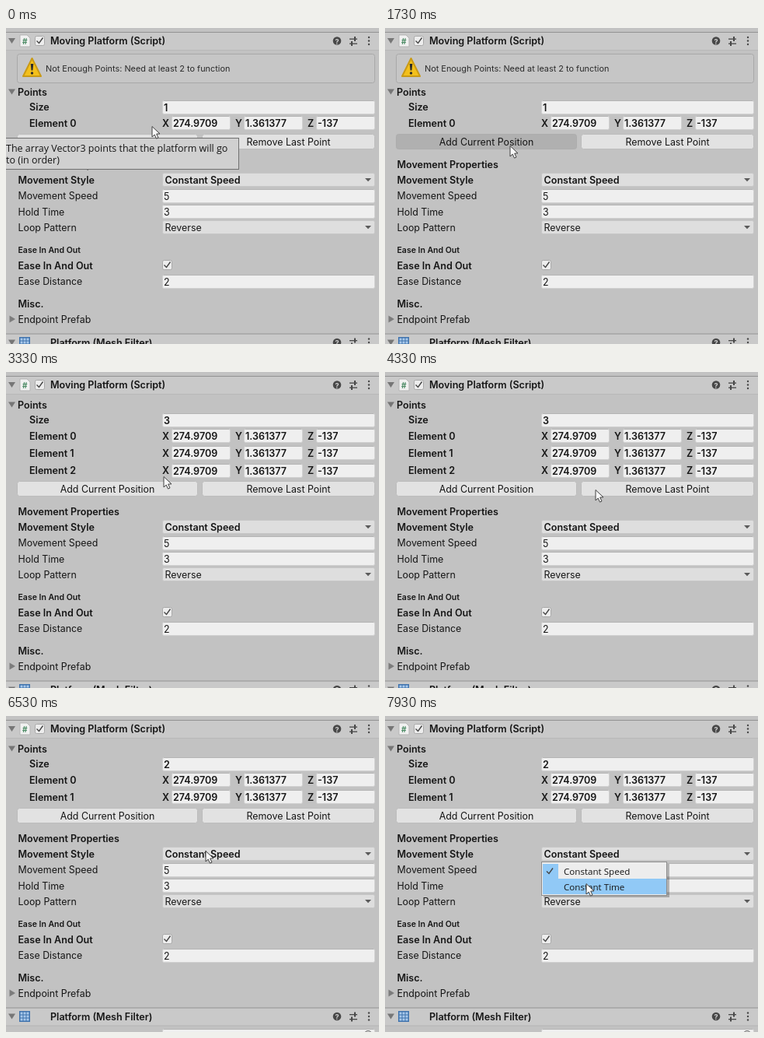
Recreate the animation shown at these times as an HTML page with a canvas. Size 480 by 406 pixels, loop 8 s.

```html
<!DOCTYPE html>
<html lang="en">
<head>
<meta charset="utf-8">
<title>Moving platform inspector</title>
<style>
html, body { margin: 0; width: 100%; height: 100%; overflow: hidden; background: #c2c2c2; }
canvas { display: block; }
</style>
</head>
<body>
<canvas id="stage" width="480" height="406"></canvas>
<script>
const ctx = document.getElementById('stage').getContext('2d');
const LOOP = 8000;
const REGULAR = '12.4px Inter, sans-serif';
const BOLD = '600 12.55px Inter, sans-serif';
const SMALL = '10.9px Inter, sans-serif';
const SMALL_BOLD = '600 10.5px Inter, sans-serif';
const INK = '#161616';

// Pointer positions: [ms, x, y]
const PATH = [
  [70, 188, 127], [530, 172, 183], [670, 172, 183], [930, 161, 152],
  [2330, 161, 152], [2530, 38, 112], [2730, 254, 146], [2800, 262, 149],
  [3130, 203, 135], [3400, 203, 135], [4000, 269, 151], [4200, 269, 151],
  [4330, 271, 152], [6000, 271, 152], [6530, 257, 174], [7470, 257, 174],
  [7930, 259, 216]
];

function pointerAt(t) {
  const i = PATH.findIndex(p => p[0] > t);
  if (i === 0) return PATH[0].slice(1);
  if (i < 0) return PATH[PATH.length - 1].slice(1);
  const [t0, x0, y0] = PATH[i - 1], [t1, x1, y1] = PATH[i];
  const k = (t - t0) / (t1 - t0), e = k * k * (3 - 2 * k);
  return [x0 + (x1 - x0) * e, y0 + (y1 - y0) * e];
}

function text(s, x, y, font = REGULAR, color = INK, align = 'left') {
  ctx.font = font;
  ctx.fillStyle = color;
  ctx.textAlign = align;
  ctx.fillText(s, x, y + 4.5);
}

function rect(x, y, w, h, color) {
  ctx.fillStyle = color;
  ctx.fillRect(x, y, w, h);
}

function poly(points, fill, stroke, width = 1) {
  ctx.beginPath();
  points.forEach(([x, y]) => ctx.lineTo(x, y));
  if (fill) {
    ctx.closePath();
    ctx.fillStyle = fill;
    ctx.fill();
  }
  if (stroke) {
    ctx.strokeStyle = stroke;
    ctx.lineWidth = width;
    ctx.stroke();
  }
}

function panel(x, y, w, h, fill, border, r = 2) {
  ctx.beginPath();
  ctx.roundRect(x + .5, y + .5, w - 1, h - 1, r);
  ctx.fillStyle = fill;
  ctx.fill();
  ctx.strokeStyle = border;
  ctx.lineWidth = 1;
  ctx.stroke();
}

function disc(x, y, r, color) {
  ctx.beginPath();
  ctx.arc(x, y, r, 0, 7);
  ctx.fillStyle = color;
  ctx.fill();
}

function field(x, y, w, value, font) {
  const top = Math.round(y - 9);
  panel(x, top, w, 18, '#efefef', '#d0d0d0');
  rect(x + 2, top, w - 4, 1, '#b4b4b4');
  text(value, x + 2, y + .5, font);
}

function dropdown(y, value, font) {
  panel(201, y - 9, 274, 18, '#dedede', '#c6c6c6');
  text(value, 204.5, y, font);
  poly([[462, y - 2], [470, y - 2], [466, y + 2.3]], '#5a5a5a');
}

function button(x, w, y, label, pressed) {
  panel(x, y - 10, w, 20, pressed ? '#b0b0b0' : '#e2e2e2', pressed ? '#adadad' : '#bcbcbc', 3);
  text(label, x + w / 2, y, REGULAR, INK, 'center');
}

function check(x, y) {
  poly([[x - 4, y], [x - 1, y + 3], [x + 4, y - 4]], null, '#444', 1.4);
}

function checkbox(x, y) {
  panel(x - 6.5, y - 6.5, 13, 13, '#ededed', '#a8a8a8');
  check(x, y);
}

function foldDown(y) {
  poly([[3, y - 3.5], [12, y - 3.5], [7.5, y + 3.5]], '#767676');
}

function header(y, title) {
  rect(0, y - 11.5, 480, 23, '#c9c9c9');
  rect(0, y - 11.5, 480, 1, '#929292');
  rect(0, y + 11.5, 480, 1, '#b8b8b8');
  foldDown(y);
  text(title, 57, y, BOLD);
  disc(426, y, 5.3, '#484848');
  text('?', 426, y - .5, '700 9px Inter, sans-serif', '#d5d5d5', 'center');
  rect(442, y - 3, 10, 1.3, '#484848');
  rect(442, y + 3, 10, 1.3, '#484848');
  rect(448, y - 5.5, 2, 6, '#484848');
  rect(444, y + .5, 2, 6, '#484848');
  for (const d of [-4.5, 0, 4.5]) disc(467, y + d, 1.2, '#484848');
}

function scriptIcon() {
  poly([[18, 9], [27, 9], [31, 13], [31, 24], [18, 24]], '#f1f1f1', '#b5b5b5');
  text('#', 24.3, 16.5, '700 10px Inter, sans-serif', '#4a8a63', 'center');
}

function gridIcon(y) {
  rect(17, y - 7, 14, 14, '#3f72ad');
  for (let i = 0; i < 9; i++) {
    rect(18.5 + i % 3 * 4, y - 5.5 + Math.floor(i / 3) * 4, 3, 3, '#a9c9ec');
  }
}

function warning() {
  panel(14, 33, 461, 38, '#c6c6c6', '#a8a8a8', 3);
  ctx.lineJoin = 'round';
  poly([[33.5, 39], [45, 62], [22, 62], [33.5, 39]], '#f3c01c', '#c99a15', 2);
  ctx.lineJoin = 'miter';
  poly([[31.7, 46], [35.3, 46], [34.4, 54.5], [32.6, 54.5]], '#2b2b2b');
  disc(33.5, 58, 1.7, '#2b2b2b');
  text('Not Enough Points: Need at least 2 to function', 51, 51.5, SMALL, '#2b2b2b');
}

function inspector(count, pressed) {
  rect(0, 0, 480, 406, '#c2c2c2');
  header(16.5, 'Moving Platform (Script)');
  scriptIcon();
  checkbox(43.5, 16.5);

  const top = count < 2 ? 82 : 42;
  if (count < 2) warning();
  foldDown(top);
  text('Points', 15, top, BOLD);
  text('Size', 30, top + 19.5, BOLD);
  field(201, top + 19.5, 274, count, BOLD);
  for (let i = 0; i < count; i++) {
    const y = top + 40 + i * 22.3;
    text('Element ' + i, 30, y, BOLD);
    [['X', 201, 213, 76, '274.9709'], ['Y', 295, 306, 76, '1.361377'], ['Z', 388, 399, 76, '-137']]
      .forEach(([axis, ax, x, w, value]) => {
        text(axis, ax, y, BOLD);
        field(x, y, w, value, BOLD);
      });
  }

  const base = top + 64 + (count - 1) * 22;
  button(14, 233, base, 'Add Current Position', pressed === 'add');
  button(252, 223, base, 'Remove Last Point', pressed === 'remove');
  const label = (s, dy, font) => text(s, 15.5, base + dy, font);
  label('Movement Properties', 29, BOLD);
  label('Movement Style', 49, BOLD);
  dropdown(base + 49, 'Constant Speed', BOLD);
  label('Movement Speed', 69.7);
  field(201, base + 69.7, 274, '5');
  label('Hold Time', 90);
  field(201, base + 90, 274, '3');
  label('Loop Pattern', 110);
  dropdown(base + 110, 'Reverse');
  label('Ease In And Out', 138.7, SMALL_BOLD);
  label('Ease In And Out', 159, BOLD);
  checkbox(207.5, base + 158.5);
  label('Ease Distance', 179.5);
  field(201, base + 179.5, 274, '2');
  label('Misc.', 208, BOLD);
  label('Endpoint Prefab', 228.5);
  const arrow = base + 228;
  poly([[4.5, arrow - 4.5], [12, arrow], [4.5, arrow + 4.5]], '#7c7c7c');

  header(base + 258, 'Platform (Mesh Filter)');
  gridIcon(base + 258);
  field(201, base + 283, 274, '');
  disc(466, base + 281, 5, '#666');
  disc(466, base + 281, 4, '#dedede');
}

function tooltip() {
  rect(0, 141, 300, 41, '#707070');
  rect(0, 142, 299, 39, '#d0d0d0');
  const font = '12.5px "Open Sans", sans-serif';
  text('The array Vector3 points that the platform will go', 0, 154, font);
  text('to (in order)', 0, 169, font);
}

function popup(alpha, pointerY) {
  ctx.globalAlpha = alpha;
  rect(204, 190, 162, 43, 'rgba(0,0,0,.25)');
  rect(201, 187, 162, 44, '#8d8d8d');
  rect(202, 188, 160, 42, '#ededed');
  const blue = '#91c9f6';
  rect(203, 190, 20, 19, blue);
  if (pointerY >= 209) rect(203, 209, 159, 20, blue);
  else if (pointerY >= 190) rect(203, 190, 159, 19, blue);
  check(212, 199.5);
  const font = '11.6px "Open Sans", sans-serif';
  text('Constant Speed', 230, 199.5, font);
  text('Constant Time', 230, 219, font);
  ctx.globalAlpha = 1;
}

function pointer(x, y) {
  const shape = [[0, 0], [0, 13.5], [3.2, 10.6], [5.5, 15.6], [8, 14.5], [5.7, 9.6], [10, 9.4], [0, 0]];
  poly(shape.map(([dx, dy]) => [x + dx, y + dy - .5]), '#f8f8f8', '#404040');
}

function draw(t) {
  const count = t < 1800 ? 1 : t < 3330 ? 2 : t < 4870 ? 3 : 2;
  const adding = t >= 1730 && t < 1800 || t >= 3270 && t < 3330;
  const removing = t >= 4800 && t < 4870;
  const [x, y] = pointerAt(t);
  inspector(count, adding ? 'add' : removing ? 'remove' : '');
  if (t < 200) tooltip();
  if (t >= 6870) popup(Math.min(1, (t - 6800) / 330), y);
  pointer(x, y);
}

function tick() {
  draw(performance.now() % LOOP);
  requestAnimationFrame(tick);
}
tick();
</script>
</body>
</html>
```
